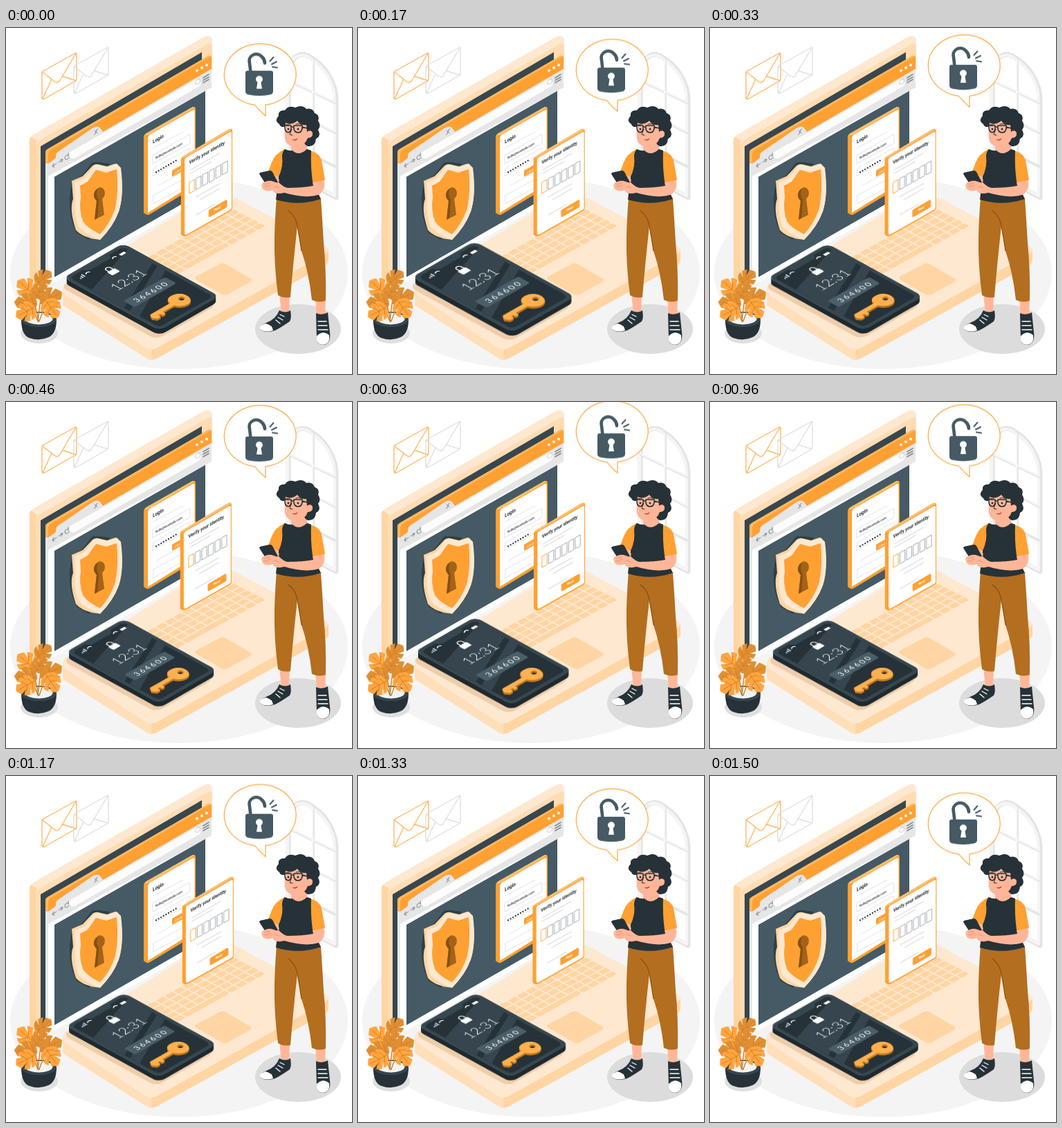
An HTML page that plays this animation: 500x500 px, repeating every 1.54 s.

```html
<!DOCTYPE html>
<html lang="en">
<head>
<meta charset="utf-8">
<title>Two-step login</title>
<style>
  html, body { margin: 0; width: 100%; height: 100%; overflow: hidden; background: #fff; }
  svg { display: block; width: 100vw; height: 100vh; }
  text { font-family: Roboto, "Open Sans", sans-serif; fill: #263238; }
  .o { fill: #ffa033; }
  .d { fill: #263238; }
  .w { fill: #fff; }
  .skin { fill: #ffb698; }
  .peach { fill: #ffe8d0; }
  .mid { fill: #ffd5a3; }
  .line { fill: none; stroke-linecap: round; stroke-linejoin: round; }
  .gray { stroke: #dedede; }
  #phone text { font-family: Lato, sans-serif; fill: #fff; text-anchor: middle; }

  #bubble, #lock, #card, #phone { animation: 1540ms linear -48ms infinite; }
  #bubble { animation-name: float; --rise: -30px; }
  #lock { animation-name: float; --rise: -20px; }
  #card { animation-name: shake; }
  #phone { animation-name: beat; transform-origin: 195.4px 380px; }

  @keyframes float {
    0%, 100% { transform: translateY(0); }
    50% { transform: translateY(var(--rise)); }
  }
  @keyframes shake {
    0%, 100% { transform: translateX(0); }
    10%, 90% { transform: translateX(-1px); }
    20%, 80% { transform: translateX(2px); }
    30%, 50%, 70% { transform: translateX(-4px); }
    40%, 60% { transform: translateX(4px); }
  }
  @keyframes beat {
    0%, 30%, 40%, 60%, 100% { transform: scale(1); }
    10%, 50% { transform: scale(1.1); }
  }
</style>
</head>
<body>
<svg viewBox="0 0 500 500">
  <defs>
    <path id="leaf" d="M0 0C-9-1-17-6-16-14L-6-11L-16-17Q-15-23-12-26L-5-18L-9-29Q-4-33 0-35Q4-33 9-29L5-18L12-26Q15-23 16-17L6-11L16-14C17-6 9-1 0 0Z"/>
    <path id="mail" d="M3 27.500L47 3Q50 1 50 4V39Q50 42 47 43.500L4 68Q0 70 0 66V32Q0 29 3 27.500ZM1 30L19 44Q22 46 25 43L49 3M14 40L1 68M30 36L49 42"/>
  </defs>

  <ellipse cx="250" cy="354" rx="244" ry="139" fill="#f4f4f4"/>

  <!-- arched window -->
  <g class="line">
    <path d="M408 208V72C409 42 425 30 444 45C464 58 477 82 477 104V245Z" stroke="#e4e4e4" stroke-width="7"/>
    <path d="M407 205V72C408 42 425 31 443 46C462 58 475 82 475 104V243Z" stroke="#f5f5f5" stroke-width="4"/>
    <path d="M444 46V225M409 76L475 108M409 117L475 151M409 166L475 200" stroke="#e6e6e6" stroke-width="4"/>
    <path d="M443 46V225M409 75L475 107M409 116L475 150" stroke="#f7f7f7" stroke-width="2"/>
  </g>

  <use href="#mail" x="52" y="34" class="line" stroke="#ffb765" stroke-width="1.400"/>
  <use href="#mail" x="98" y="26" class="line" stroke="#e0e0e0" stroke-width="1.400"/>

  <!-- laptop lid -->
  <path class="peach" d="M34 164Q34 157 41 153L284 14Q298 7 298 20V240L50 374L34 362Z"/>
  <path class="mid" d="M34 164Q34 159 36 157L45 163Q43 166 43 172V368L34 362Z"/>
  <path fill="#ffdcb3" d="M43 173Q43 166 49 162L290 24Q298 19 298 27V240L43 378Z"/>
  <path fill="#37474f" d="M50 171L283 35V245L50 372Z"/>

  <!-- browser -->
  <path fill="#e88d25" d="M57 181Q57 177 61 175L65 178V200L57 195Z"/>
  <path fill="#e8e8e8" d="M57 192L62 195V372L57 369Z"/>
  <path class="w" d="M61 198L298 60V238L61 373Z"/>
  <path class="o" d="M57 180Q57 177 60 175L291 41Q297 38 297 44V60L61 196L57 195Z"/>
  <path fill="#ffb85f" d="M57 178L60 175L291 41Q294 39 296 41L65 176Q61 179 61 183V196L57 194Z"/>
  <path fill="#e6e6e6" d="M61 200V196L72 188V184Q72 181 75 179L126 144Q134 140 137 146L140 150L297 59V86L61 214Z"/>
  <path class="line" d="M97 183L276 80" stroke="#fcfcfc" stroke-width="11"/>
  <path class="line" d="M128 148L132 152M132 146L128 154M73 196L67 200L70 201M67 200L69 196M76 194L82 190L79 190M82 190L80 194M90 184Q85 183 85 189Q88 192 91 187M90 181V185" stroke="#78868c"/>
  <path class="line" d="M285 72L293 67M285 75.500L293 71M285 79L293 74.500" stroke="#858f94" stroke-width="1.700"/>
  <path class="line" d="M274 77L278 73L281 76L278 81L274 81Z" stroke="#d2d2d2"/>
  <g class="w"><circle cx="276" cy="61.500" r="2"/><circle cx="283" cy="57.500" r="2"/><circle cx="290" cy="53.500" r="2"/></g>
  <path fill="#455a64" d="M70 215L288 91V235L70 360Z"/>

  <!-- shield -->
  <path fill="#2f3f47" d="M95 222L110 213L124 195Q128 193 134 194L150 196L120 306L102 296Q91 275 92 245Z"/>
  <path class="mid" d="M95 221L111 214L125 199Q129 196 133 197L146 200L158 196L165 202Q171 240 163 265Q155 287 136 306Q112 304 101 292Q91 262 97 247Z"/>
  <path class="peach" d="M99 223L114 217L127 200Q131 197 135 198L147 201L160 196L166 202Q171 240 163 265Q155 287 136 306Q116 299 105 288Q97 267 100 247Z"/>
  <path class="o" d="M107 228L118 222L130 205L145 209L160 204Q163 235 158 260Q151 282 136 298Q117 289 111 279Q105 262 108 245Z"/>
  <path fill="#a3631a" d="M131 250Q124 243 129 235Q136 226 142 234Q145 241 139 247L142 270L128 277Z"/>
  <path fill="#85500f" d="M131 250Q124 243 129 235L133 232Q129 242 134 248L132 275L128 277Z"/>

  <!-- laptop base -->
  <path class="mid" d="M82 380L210 460L466 320V336Q466 340 461 343L219 477Q211 482 203 477L86 403Q82 401 82 396Z"/>
  <path fill="#ffdfba" d="M82 380L210 460V480Q206 480 203 477L86 403Q82 401 82 396Z"/>
  <path class="peach" d="M85 370L300 238Q318 239 335 247L461 315Q470 321 461 327L219 462Q210 467 201 462L86 386Q78 378 85 370Z"/>
  <g id="keys" class="mid" transform="matrix(.87 -.48 .87 .45 178 346)"></g>
  <path class="mid" d="M275 359L309 341Q313 339 317 341L353 362Q357 364 353 367L320 385Q316 387 312 385L275 364Q271 361 275 359Z"/>

  <!-- login card -->
  <path class="o" d="M199 158Q199 154 203 152L268 115Q274 112 274 118V226Q274 229 271 231L208 269Q204 272 199 267Z"/>
  <path fill="#ffbf70" d="M200 155L203 152L268 115Q271 113 273 115L205 155Z"/>
  <path class="w" d="M205 159Q205 156 208 154L269 119Q272.500 117 272.500 120V225L205 267Z"/>
  <text transform="matrix(.85 -.47 0 1 212 167)" font-size="7.500" font-weight="600">Login</text>
  <g class="line gray">
    <path d="M213 173L256 150M212 184L265 154Q266 154 266 156V167L212 196ZM213 203L266 173V184L212 214Z" stroke-width=".8"/>
    <path d="M218 229L248 212M213 242L266 213V225L213 254Z" stroke-width=".8"/>
  </g>
  <text transform="matrix(.85 -.46 0 1 216 189.500)" font-size="5" font-weight="500">hello@example.com</text>
  <path class="line" d="M217 208.500L246 191.500" stroke="#263238" stroke-width="2.300" stroke-dasharray="0 4.150"/>
  <path class="o" d="M240 206L268 190V200L240 215Z"/>
  <text transform="matrix(.85 -.47 0 1 244 211)" font-size="5" style="fill:#fff">Continue</text>

  <!-- verification card -->
  <g id="card">
    <path class="o" d="M253 191Q253 187 257 185L321 147Q327.500 143 327.500 149V260Q327.500 263 324 265L262 300Q256 303 253 298Z"/>
    <path fill="#ffbf70" d="M254 188L257 185L321 147Q325 145 327 147L259 187Z"/>
    <path class="w" d="M258.500 191Q258.500 188 261 187L323 151Q326.300 149 326.300 152V259Q326.300 262 323 263.500L262 298Q258.500 300 258.500 296Z"/>
    <text transform="matrix(.84 -.475 0 1 265 197)" font-size="7.200" font-weight="600">Verify your identity</text>
    <path class="line gray" d="M267 205L309 181M267 210L297 193M275 244L309 225M275 270L301 255M281 248L309 232" stroke-width="1.200"/>
    <g id="boxes" class="line"></g>
    <path class="o" d="M293 265Q293 263 295 262L318 248.500Q320 247.500 320 250V257Q320 259 318 260L295 273Q293 274 293 271Z"/>
    <text transform="matrix(.85 -.47 0 1 301.500 265)" font-size="5.200" font-weight="600" style="fill:#fff">Next</text>
  </g>

  <!-- phone -->
  <g id="phone">
    <rect transform="matrix(.87 -.5 .876 .482 82 374)" width="97" height="154" rx="10" fill="#a8671c" opacity=".2"/>
    <g id="side" fill="#1f2a2f"></g>
    <g transform="matrix(.87 -.5 .876 .482 86.500 361.500)">
      <rect width="96" height="153.500" rx="9" fill="#455a64"/>
      <rect x="1" y="1" width="95" height="152.500" rx="9" fill="#37474f"/>
      <rect x="5" y="5" width="86" height="143.500" rx="6" class="d"/>
      <path d="M5 40L91 12V52L5 92ZM5 101L91 60V73L5 117Z" fill="#37464e"/>
      <path fill="#37474f" d="M27 4H69Q67 11 62 11H34Q29 11 27 4Z"/>
      <g class="w">
        <path d="M12 16h1.500v-2H12zM15 16h1.500v-4H15zM18 16h1.500v-6H18zM77 12h8v4h-8z"/>
        <rect x="42" y="28" width="12" height="9" rx="1.500"/>
      </g>
      <path class="line" d="M44.500 28V24.500A3.500 3.500 0 0 1 51.500 24.500V28M23 13Q26 10 29 13M72 13Q69 10 66 13" stroke="#fff" stroke-width="1.400"/>
      <text x="48" y="63" font-size="19.500" font-weight="300">12:31</text>
      <rect x="14" y="82" width="67" height="18" rx="3" fill="#4b5f69"/>
      <text x="49" y="95.500" font-size="11" letter-spacing="2.500">364600</text>
      <g id="key" transform="translate(-1 10) scale(.92)"></g>
    </g>
  </g>

  <!-- plant -->
  <ellipse cx="48" cy="441" rx="27" ry="15" fill="#dfdfdf"/>
  <path class="d" d="M22 421Q22 444 34 448Q48 453 61 447Q73 442 73 421Z"/>
  <ellipse cx="47.500" cy="421" rx="25.500" ry="11" fill="#37474f"/>
  <ellipse cx="47.500" cy="420" rx="20" ry="8.500" fill="#f3f3f3"/>
  <path class="line" d="M46 424Q50 390 53 368M47 424Q42 392 32 382M46 424Q40 404 30 402M48 424Q54 404 64 396" stroke="#c87a20" stroke-width="1.300"/>
  <g id="plant"></g>

  <!-- woman -->
  <ellipse cx="422" cy="435" rx="62" ry="36" fill="#dcdcdc"/>
  <path class="skin" d="M395 384H410L409 412H398ZM447 390H462L461 418H449Z"/>
  <path class="d" d="M395 408Q404 413 411 408Q413 419 410 424Q397 433 389 437Q374 442 367 435Q366 430 376 426Q390 421 395 408ZM448 412Q456 416 465 411L468 440Q470 455 460 458Q450 459 449 450Z"/>
  <path class="w" d="M367 435Q365 430 375 427Q385 429 386 437Q374 441 367 435ZM449 445Q458 436 467 444Q469 455 460 457.500Q451 459 449 451Z"/>
  <path class="line" d="M390 422L396 427M393 418L400 422M396 414L402 417M451 424H463M451 430H464M451 436H465" stroke="#fff" stroke-width="1.300"/>
  <path fill="#b36e20" d="M391 245L455 246Q457 275 459 310Q463 350 462 394Q453 398 442 393Q438 355 427 322L421 286Q415 340 411 389Q401 391 393 386Q387 340 388 300Q389 268 391 245Z"/>
  <path class="line" d="M421 286Q419 272 408 264M427 322Q424 302 421 286" stroke="#874f10" stroke-width="1.200"/>
  <path class="skin" d="M412 160H434L436 181Q424 188 412 180Z"/>
  <path class="o" d="M403 175Q389 181 384 194L378 210Q386 217 396 215L406 190ZM437 177Q452 179 456 191L461 219Q451 226 441 223Z"/>
  <path class="d" d="M403 175Q409 178 414 177Q423 186 435 175L441 177Q440 200 443 222L455 247Q423 258 390 248L394 215Q401 200 399 186Q399 179 403 175Z"/>
  <path class="skin" d="M380 209L392 214Q390 225 384 235Q376 237 371 233Q368 228 371 223Q378 224 380 209ZM443 223L460 220Q462 235 452 241Q433 247 402 238Q391 241 387 237Q380 229 386 225Q388 218 392 215Q396 219 394 223Q401 230 407 231Q430 231 444 228Z"/>
  <path class="d" d="M367 209L381 206Q384 206 385 208L393 223L380 227Q377 228 375 225L366 211Z"/>
  <path class="skin" d="M373 223Q380 219 387 222Q392 223 396 227Q391 230 385 228Q378 234 372 231Z"/>
  <path class="line" d="M374 226L381 224M374 230L382 227M388 229L394 231" stroke="#d8845f" stroke-width=".7"/>
  <path class="d" d="M405 142Q397 145 395 139Q387 134 394 127Q393 118 403 119Q408 111 418 115Q428 110 434 117Q443 115 446 123Q454 126 451 134Q456 141 451 147Q456 156 448 160Q447 172 436 171Q429 168 430 158Z"/>
  <path class="skin" d="M404 137Q401 154 404 164Q409 172 419 172Q432 171 436 159Q444 159 443 151Q440 146 435 150L434 140Q425 141 421 134Q413 141 404 137Z"/>
  <path class="line" d="M404 140L410 139M419 139Q424 137 428 140M413 146L410 154L414 155" stroke="#263238" stroke-width="1"/>
  <path d="M413 161Q418 162 422 159Q419 165 413 161Z" fill="#a03c32"/>
  <circle cx="408" cy="146" r="1.500" class="d"/><circle cx="422" cy="146" r="1.500" class="d"/>
  <path class="line" d="M403 141H412Q413 150 408 151Q402 150 403 141ZM416 141H428Q429 151 422 151Q415 151 416 141ZM412 143H416M428 143L439 146" stroke="#263238" stroke-width="1.500"/>

  <!-- speech bubble -->
  <path id="bubble" class="w" d="M359.500 113.200A52 44.500 0 1 1 375 113.200V129Q367 122.500 359.500 113.200Z" stroke="#ffa640" stroke-width="1.200"/>
  <g id="lock">
    <g class="line" stroke="#455a64">
      <path d="M353.500 65L352 52C349 40 363 35 370 43Q374 47 374 52" stroke-width="4.600"/>
      <path d="M381.500 49L386.500 43.500M384 53.500L391 50M385 57.500L392 58.500" stroke-width="2"/>
    </g>
    <path fill="#455a64" d="M346 66Q346 63 349 63H383Q386 63 386 66V93Q386 96 382 97.500Q366 101 350 97.500Q346 96 346 93Z"/>
    <path class="w" d="M363.500 79.500A5 5 0 1 1 368.500 79.500L370 89H362Z"/>
  </g>
</svg>
<script>
const fill = (id, n, make) =>
  document.getElementById(id).innerHTML = Array.from({ length: n }, (_, i) => make(i)).join('');

// keyboard: five rows, the front one with a space bar
fill('keys', 60, i => {
  const col = i % 12, row = i / 12 | 0;
  if (row === 4 && col > 3 && col < 8) return '';
  const wide = row === 4 && col === 3 ? 71 : 12.4;
  return `<rect x="${col * 14.7}" y="${row * 10.8}" width="${wide}" height="8.8" rx="1.5"/>`;
});

fill('boxes', 6, i => {
  const x = 265.5 + i * 9.6, y = 223 - i * 5.4;
  return `<path d="M${x} ${y}l7-4v16l-7 4z" stroke="${i ? '#9aa4a9' : '#ffa033'}" stroke-width=".9"/>`;
});

fill('side', 8, i =>
  `<rect transform="matrix(.87 -.5 .876 .482 86.5 ${368.5 - i})" width="96" height="153.5" rx="9"/>`);

const keyShape = 'M53 123C54 112 66 111 73 115C83 120 80 138 69 140C61 141 55 136 53 130H33V135H28V131H24V136H18L14 130L18 123ZM70 122A4 4 0 1 0 70 130A4 4 0 1 0 70 122Z';
fill('key', 4, i => {
  const s = 3 - i;
  return `<path d="${keyShape}" fill-rule="evenodd" fill="${s ? '#c47618' : '#ffb04f'}" transform="translate(${-s} ${s})"/>`;
});

// each leaf: x, y, turn, size
const leaves = [[44, 370, 50, .8], [42, 386, -50, .95], [45, 399, -85, .95], [42, 403, -118, .9],
                [50, 398, 62, 1], [57, 393, 145, .9], [42, 390, 35, .75]];
fill('plant', leaves.length, i => {
  const [x, y, turn, size] = leaves[i];
  return `<g transform="translate(${x} ${y}) rotate(${turn}) scale(${size})">
    <use href="#leaf" fill="${i % 2 ? '#ffa540' : '#e08f33'}"/>
    <path class="line" d="M0 0V-30M0-5L-9-9M0-5L9-9M0-14L-9-20M0-14L9-20" stroke="#c97a20" stroke-width=".8"/></g>`;
});
</script>
</body>
</html>
```
